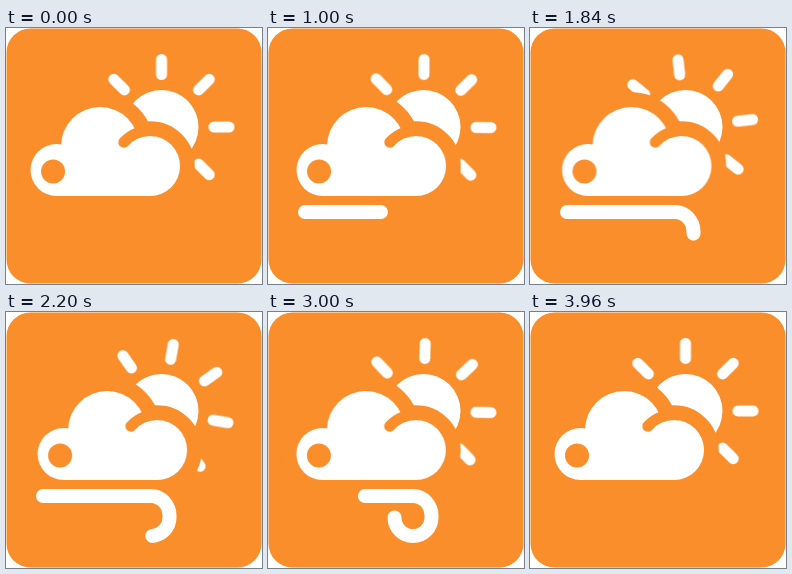
Recreate the animation shown at these times as an HTML page. Size 256 by 256 pixels, loop 4000 ms.

```html
<!DOCTYPE html>
<html lang="en">
<head>
<meta charset="utf-8">
<title>Windy with sun</title>
<style>
  html, body { margin: 0; width: 100%; height: 100%; overflow: hidden; background: #fff; }
  svg { display: block; width: 100%; height: 100%; }

  .tile, .gap, .hole { fill: #f98e2b; }
  .sun, .cloud { fill: #fff; }
  .gap { stroke: #f98e2b; stroke-width: 29.5; }
  .notch { fill: none; stroke: #f98e2b; stroke-width: 11; stroke-linecap: round; }

  .rays line {
    stroke: #fff; stroke-width: 11; stroke-linecap: round;
    stroke-dasharray: 15 105;
  }
  .wind {
    fill: none; stroke: #fff; stroke-width: 14; stroke-linecap: round;
    stroke-dasharray: 198 400;
    animation: blow 4s linear infinite, show 4s step-end infinite;
  }
  .rays { animation: spin 4s linear infinite; }
  .drift { animation: drift 4s linear infinite; }

  @keyframes spin {
    0% { transform: rotate(0deg); }
    99%, 100% { transform: rotate(180deg); }
  }
  @keyframes drift {
    0%, 99%, 100% { transform: translateX(0); }
    49.5% { transform: translateX(8px); }
  }
  @keyframes blow {
    0% { stroke-dashoffset: 198; }
    65% { stroke-dashoffset: 0; }
    98%, 100% { stroke-dashoffset: -198; }
  }
  @keyframes show {
    0%, 98%, 100% { opacity: 0; }
    0.9% { opacity: 1; }
  }
</style>
</head>
<body>
<svg viewBox="0 0 256 256">
  <defs>
    <g id="puffs">
      <circle cx="50.5" cy="142" r="26"/>
      <circle cx="94" cy="118" r="39"/>
      <circle cx="144" cy="138" r="30"/>
      <rect x="50.5" y="130" width="93.5" height="38"/>
    </g>
  </defs>

  <rect class="tile" x=".5" y=".5" width="255" height="255" rx="24"/>

  <g transform="translate(155.5 99)">
    <circle class="sun" r="37"/>
    <g class="rays">
      <line y1="-67.5" y2="67.5"/>
      <line y1="-67.5" y2="67.5" transform="rotate(45)"/>
      <line y1="-67.5" y2="67.5" transform="rotate(90)"/>
      <line y1="-67.5" y2="67.5" transform="rotate(135)"/>
    </g>
  </g>

  <g class="drift">
    <use class="gap" href="#puffs"/>
    <use class="cloud" href="#puffs"/>
    <path class="notch" d="M117.8 114.2A35.5 35.5 0 0 1 148 102.7"/>
    <circle class="hole" cx="47" cy="143.4" r="12"/>
  </g>

  <path class="wind" pathLength="198"
    d="M37 184H145A18.5 20 0 0 1 163.5 204V205.5A18.5 18.5 0 0 1 126.5 205.5"/>
</svg>
</body>
</html>
```
